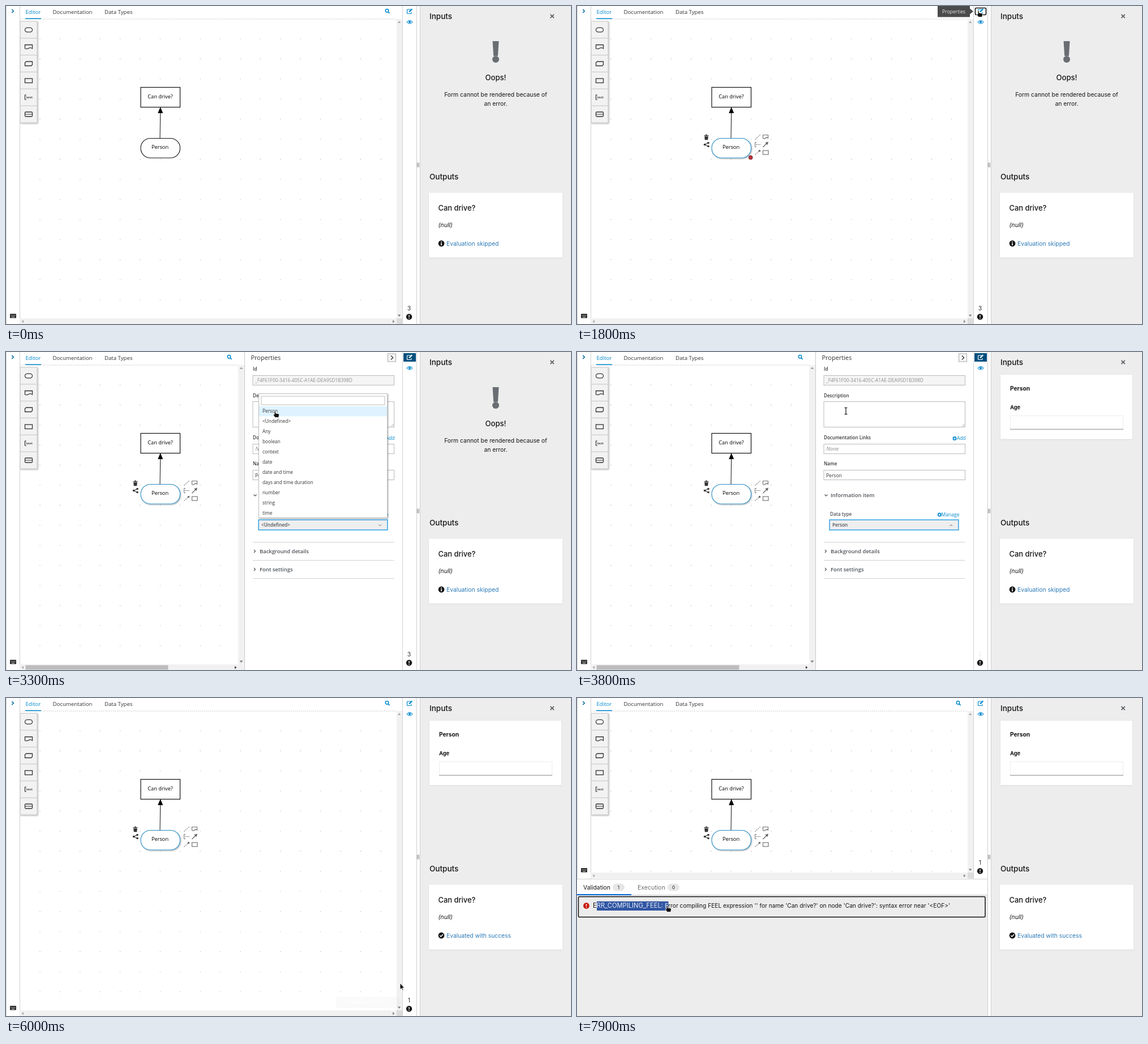
Recreate the animation shown at these times as an HTML page. Size 998 by 561 pixels, loop 8000 ms.

```html
<!DOCTYPE html>
<html lang="en">
<head>
<meta charset="utf-8">
<title>Decision editor</title>
<style>
html, body { margin: 0; width: 100%; height: 100%; overflow: hidden; background: #fff; }
svg { display: block; width: 100vw; height: 100vh; }
text { font-family: "Open Sans", sans-serif; white-space: pre; }
.ui { font-family: Inter, sans-serif; }
</style>
</head>
<body>
<svg id="stage" viewBox="0 0 998 561"></svg>
<script>
const LOOP = 8000, BLUE = '#0088ce', LINK = '#2b7ab8', GREY = '#ededed', INK = '#151515';
const ERROR = 'Error compiling FEEL expression \'\' for name \'Can drive?\' on node \'Can drive?\': syntax error near \'&lt;EOF&gt;\'';

// cy is the middle of the capital letters
const text = (x, cy, s, size, fill = '#333', more = '') =>
  `<text x="${x}" y="${cy + size * .36}" font-size="${size}" fill="${fill}" ${more}>${s}</text>`;
const ui = (x, cy, s, size, fill = INK, more = '') => text(x, cy, s, size, fill, 'class="ui" ' + more);
const rect = (x, y, w, h, fill = 'none', stroke = 'none', more = '') =>
  `<rect x="${x}" y="${y}" width="${w}" height="${h}" fill="${fill}" stroke="${stroke}" ${more}/>`;
const line = (d, stroke = '#333', w = 1, more = '') =>
  `<path d="${d}" fill="none" stroke="${stroke}" stroke-width="${w}" ${more}/>`;
const fill = (d, c = '#333', more = '') => `<path d="${d}" fill="${c}" ${more}/>`;
const dot = (x, y, r, c) => `<circle cx="${x}" cy="${y}" r="${r}" fill="${c}"/>`;
const group = (id, body, more = '') => `<g id="${id}" ${more}>${body}</g>`;
const bold = 'font-weight="600"', mid = 'text-anchor="middle"';

const search = x => `<circle cx="${x - 1}" cy="8.3" r="2.7" fill="none" stroke="${BLUE}" stroke-width="1.5"/>` +
  line(`M${x + 1} 10.3l2.6 2.6`, BLUE, 1.8);
const pencil = c => line('M715 6H709.5Q708.5 6 708.5 7V12.5Q708.5 13.5 709.5 13.5H715Q716 13.5 716 12.5V11', c, 1.2) +
  line('M712 10.5L717.3 5.2', c, 2.2);
const tip = (id, x, cy, s) => group(id, rect(x, cy - 10, 694 - x, 20, '#4b4b4b') +
  fill(`M694 ${cy - 5}l6 5-6 5z`, '#4b4b4b') + text((x + 694) / 2, cy, s, 8.5, '#e8e8e8', mid));
const gear = (x, y) => dot(x, y, 3.4, BLUE) + line(`M${x - 2} ${y}h4M${x} ${y - 2}v4`, '#fff', 1.2);

function grid() {
  let d = '';
  for (let x = 24.6; x < 690; x += 35.4)
    for (let y = 58; y < 550; y += 35.4) d += `M${x.toFixed(1)} ${y.toFixed(1)}h0`;
  return line(d, '#c4c4c4', 1.6, 'stroke-linecap="round"') + line('M24 23H690', '#c9c9c9', 1, 'stroke-dasharray="2 1.5"');
}

function palette() {
  const wave = 'M33.5 68.5H46.5V75Q43 72.5 40 74.5T33.5 75Z', cut = 'M35.5 98H46.5V103.5L44.5 105.5H33.5V100Z';
  let s = rect(25, 27, 30, 179, '#f2f2f2', '#c4c4c4', 'filter="url(#soft)"');
  for (let i = 1; i < 6; i++) s += line(`M25 ${27 + i * 29.8}h30`, '#c4c4c4');
  return s + rect(33.5, 38.3, 13, 7.6, '#fff', '#333', 'rx="3.8" stroke-width="1.3"') +
    line(wave, '#333', 1.3) + line(cut, '#333', 1.3, 'stroke-linejoin="round"') +
    rect(33.5, 128, 13, 7.5, 'none', '#333', 'stroke-width="1.3"') +
    line('M36 157H33.5V165H36', '#333', 1.2) + text(35.5, 161, 'text', 6, '#333', bold) +
    rect(33.5, 187, 13, 8, 'none', '#333', 'rx="1.5" stroke-width="1.3"') + line('M33.5 191h13');
}

function diagram() {
  const tools =
    fill('M224.5 228h8v1.2h-8zM227 226.7h3v1.3h-3zM225.2 230h6.6l-.6 6.2h-5.4z') +
    line('M231.5 241.5L225.5 244.5L231.5 247.5', '#333', 1.2) +
    dot(232, 241.5, 1.8, '#333') + dot(225.5, 244.5, 1.8, '#333') + dot(232, 247.5, 1.8, '#333') +
    line('M314.5 235.5L324.5 226.5M314.5 262.5L322 256', '#777', 1.1, 'stroke-dasharray="2 1.4"') + dot(322.5, 255.5, 1.7, '#666') +
    line('M317 240.5H314.5V248.5H317', '#777') + line('M316 244.5H324', '#777', 1, 'stroke-dasharray="2 1"') +
    line('M328.5 227.5H337.5V233Q335 231 333 233T328.5 233.5Z', '#777', 1.2) +
    line('M328.5 249L335 242.5', '#666', 1.3) + fill('M338 239.5l-1.5 5.8-4.2-4.2z', '#666') +
    rect(328.5, 255, 9.5, 7, 'none', '#777', 'stroke-width="1.2"');
  const pill = (c, more) => rect(238, 233.5, 69.5, 34.5, '#fff', c, 'rx="17" stroke-width="1.1" ' + more);
  return rect(238, 143.5, 69.5, 35, '#fff', '#111', 'stroke-width="1.2"') + text(272.5, 160, 'Can drive?', 9.25, '#000', mid) +
    line('M272 233L272.7 188', '#111') + fill('M272.7 178l4.5 11h-9z', '#000') +
    pill('#111', 'id="idle"') + group('picked', pill('#2c8fc6', 'filter="url(#soft)"') + tools) +
    text(272, 248.5, 'Person', 9.25, '#000', mid) +
    group('handle', `<circle cx="306.7" cy="267.3" r="3.5" fill="#b8323a" stroke="#6e2430" stroke-width=".8"/>`);
}

function properties() {
  const label = (y, s) => text(436, y, s, 8.05, '#363636', bold);
  const field = (y, h, bg = '#fff') => rect(436, y, 249.5, h, bg, '#bbb');
  const section = (y, s, d) => line(d, '#555', 1.2) + text(448, y, s, 9.4, '#4d5258', bold);
  const types = ['Person', '&lt;Undefined&gt;', 'Any', 'boolean', 'context', 'date', 'date and time',
    'days and time duration', 'number', 'string', 'time'];
  const menu = rect(446.5, 73.5, 227, 219, '#fff', '#bbb', 'filter="url(#soft)"') + rect(451, 78, 218, 15, '#fff', '#bbb') +
    rect(447, 95.5, 226, 18, '#def3ff') + types.map((s, i) => text(453, 104 + i * 18, s, 8.3)).join('');
  return rect(410, 0, 290, 561, '#fff') + rect(410, 23, 11, 528, '#f1f1f1') +
    fill('M412.5 30l3-3.5 3 3.5z', '#a3a3a3') + fill('M412.5 544.5l3 3.5 3-3.5z', '#777') +
    line('M421.5 0V561', '#c8c8c8') + search(395) +
    text(432.5, 10.5, 'Properties', 10.95, '#333') +
    rect(674.5, 3, 14, 14, '#f5f5f5', '#aaa') + line('M680 6.5l3.5 3.5-3.5 3.5', '#333', 1.3) +
    rect(675, 3.5, 13, 13, 'none', '#111', 'id="closeRing" rx="1" stroke-width="1.5"') +
    label(30, 'Id') + field(41.5, 17, '#f5f5f5') + text(440, 50.5, '_F4F61F00-3416-405C-A1AE-DEA95D1B398D', 8.33, '#8b8d8f') +
    label(77, 'Description') + field(87.5, 45) + line('M680 131.5l4.5-4.5M683 131.5l1.5-1.5', '#888', .8) +
    label(151, 'Documentation Links') + gear(667, 152.5) + text(671, 152.5, 'Add', 8.3, BLUE) +
    field(162.5, 17) + text(440.5, 171, 'None', 9.3, '#888', 'font-style="italic"') +
    label(197.5, 'Name') + field(208.5, 17) + text(440, 217.5, 'Person', 8.5) +
    section(252.5, 'Information item', 'M437.5 251.5l2.5 2.5 2.5-2.5') +
    text(447, 286, 'Data type', 8.2, '#4d5258', bold) + gear(640.3, 287) + text(643.5, 287, 'Manage', 8.6, BLUE) +
    group('glow', rect(446.5, 296.5, 227, 17, 'none', '#4db2ee', 'stroke-width="3"'), 'opacity=".7"') +
    rect(446.5, 296.5, 227, 17, '#eee', '#bbb', 'id="select"') +
    group('undefinedType', text(451, 305, '&lt;Undefined&gt;', 8.2, '#4d5258', bold) + line('M658.5 304.5l2.3 2.3 2.3-2.3', '#666')) +
    group('personType', text(451, 305.5, 'Person', 8.15, '#4d5258', bold) + line('M658.5 307l2.3-2.3 2.3 2.3', '#666')) +
    line('M436 335.5H685.5M436 367.5H685.5M436 399.5H685.5', '#d1d1d1') +
    section(352, 'Background details', 'M438 349l2.5 2.5-2.5 2.5') + section(384, 'Font settings', 'M438 381l2.5 2.5-2.5 2.5') +
    group('menu', menu);
}

function footer() {
  const closed = rect(24, 551, 676, 10, '#f1f1f1') + rect(690, 551, 10, 10, '#dcdcdc') +
    fill('M692 544.5l2.6 3.5 2.6-3.5z', '#777') + fill('M683 554l3.5 2.6-3.5 2.6z', '#888') + fill('M31 554l-3.5 2.6 3.5 2.6z', '#aaa');
  const open = rect(24, 551, 397, 10, '#f1f1f1') + rect(34.5, 552.5, 252, 8, '#bdbdbd') +
    fill('M404 554l3.5 2.6-3.5 2.6z', '#444') + fill('M31 554l-3.5 2.6 3.5 2.6z', '#aaa');
  return group('closedBar', closed) + group('openBar', open) +
    rect(7, 543, 11, 7.5, '#222', 'none', 'rx="1"') + line('M8.5 545.2h8.2M8.5 547h8.2', '#fff', .8, 'stroke-dasharray="1 .8"') + line('M10 549h5', '#fff', .8) +
    ui(712, 533.5, '3', 10.5, '#333', mid + ' id="count"') +
    dot(712, 548.3, 5.2, INK) + line('M712 545.2v3.6M712 550v1.5', '#fff', 1.5);
}

function frame() {
  return line('M.5 0V561M24.5 0V561M700.5 0V561', '#d2d2d2') + line('M10.3 6l3 3-3 3', '#006aa5', 1.6) +
    text(34.5, 10.5, 'Editor', 9.6, BLUE, 'font-weight="500"') + rect(34, 21.5, 28, 1.5, BLUE) +
    text(82.5, 10.5, 'Documentation', 9.65) + text(174, 10.5, 'Data Types', 9.65);
}

function sideIcons() {
  return rect(701, 0, 24, 561, '#fff') + group('editIdle', pencil(BLUE)) +
    group('editActive', rect(702, 2, 22, 15, '#004f7f') + pencil('#fff')) +
    rect(703.5, 3.5, 19, 12, 'none', '#111', 'id="editRing" rx="1.5" stroke-width="1.6"') +
    line('M708 28.5Q713 22.5 718 28.5Q713 34 708 28.5Z', BLUE, 1.1) + dot(713, 28.2, 2, BLUE);
}

function problems() {
  const badge = (x, s) => rect(x, 327.5, 21, 13, '#e6e6e6', 'none', 'rx="6.5"') + ui(x + 10.5, 334.2, s, 8, INK, mid);
  const message = c => ui(28, 366.5, `<tspan font-size="11.2">ERR_COMPILING_FEEL:</tspan><tspan x="155">${ERROR}</tspan>`, 10.2, c);
  return rect(0, 320, 725, 241, GREY) + rect(0, 320, 725, 28, '#fff') + line('M0 319.5H725', '#d2d2d2') +
    ui(11, 334, 'Validation', 10.4) + badge(63, '1') + ui(107, 334, 'Execution', 10.5, '#6a6e73') + badge(160, '0') +
    line('M0 347.5H725', '#d2d2d2') + rect(0, 346, 96, 2, '#0066cc') +
    rect(2.5, 350.5, 718.5, 36, '#ececec', '#111', 'id="focus" rx="2" stroke-width="1.5"') +
    dot(16.5, 366.5, 5.4, '#c9190b') + line('M16.5 363.3v3.8M16.5 368.3v1.5', '#fff', 1.5) + message(INK) +
    `<clipPath id="range">${rect(35, 358.5, 0, 16.5, '#000', 'none', 'id="marked"')}</clipPath>` +
    `<g clip-path="url(#range)">${rect(35, 358.5, 200, 16.5, '#3156a3')}${message('#e6ecf8')}</g>`;
}

function results() {
  return rect(725, 0, 273, 561, GREY) + rect(725, 0, 6, 561, '#fff') + line('M725.5 0V561M731.5 0V561', '#cfcfcf') +
    line('M726.8 276.5v8M729.2 276.5v8', '#777') +
    ui(748, 18.5, 'Inputs', 13.5, INK, 'font-weight="500"') + line('M961.5 14.8l6.4 6.4M967.9 14.8l-6.4 6.4', '#5a5e63', 1.7) +
    group('oops', fill('M859.5 62h11l-1.6 26h-7.8z', '#6a6e73') + dot(865, 94, 6, '#6a6e73') +
      ui(865, 126.3, 'Oops!', 13, INK, mid + ' font-weight="500"') +
      ui(865, 156, 'Form cannot be rendered because of', 10.35, INK, mid) + ui(865, 172.5, 'an error.', 10.35, INK, mid)) +
    group('form', rect(748, 40, 233, 113.5, '#fff', 'none', 'filter="url(#faint)"') + ui(765, 64.5, 'Person', 10.2, INK, 'font-weight="700"') +
      ui(765, 98, 'Age', 9.3, INK, 'font-weight="700"') + rect(765.5, 112.5, 199, 24, '#fff', '#ededed') + line('M765 136.3H965', '#8a8d90')) +
    ui(748, 301, 'Outputs', 13.5, INK, 'font-weight="500"') +
    group('output', rect(747, 329.5, 236, 114, '#fff', 'none', 'filter="url(#faint)"') +
      ui(763.5, 356, 'Can drive?', 12.9, INK, 'font-weight="500"') + ui(763.5, 386, '(null)', 10.6, INK, 'font-style="italic"') +
      dot(769, 419, 5.4, INK) +
      group('skipped', line('M769 415.6v1.6M769 418.3v4', '#fff', 1.7) + ui(778, 419, 'Evaluation skipped', 10.4, LINK)) +
      group('success', line('M766.3 419l2 2 3.6-3.9', '#fff', 1.5) + ui(778, 419, 'Evaluated with success', 10.3, LINK)));
}

const outline = 'stroke="#fff" stroke-width=".8"';
const pointer = group('arrow', fill('M0 0V11.3L2.6 9 4.3 12.8 6 12 4.3 8.4H7.8Z', '#111', outline)) +
  group('hand', fill('M0 0Q1.2 0 1.2 1.3V4L6 4.8Q7.8 5.2 7.5 7L6.6 11.5H.3L-3 7Q-2.6 5.3-1 6.3V1.3Q-1 0 0 0Z', '#111', outline)) +
  group('beam', line('M-2.5-6Q0-6 0-4.5Q0-6 2.5-6M0-5V5M-2.5 6Q0 6 0 4.5Q0 6 2.5 6', '#111', 1.2));

stage.innerHTML = `<defs>
  <filter id="soft" x="-20%" y="-20%" width="150%" height="150%"><feDropShadow dx="1.2" dy="1.2" stdDeviation="1.2" flood-opacity=".3"/></filter>
  <filter id="faint"><feDropShadow dx="0" dy=".7" stdDeviation=".8" flood-opacity=".1"/></filter></defs>` +
  rect(0, 0, 998, 561, '#fff') + grid() + rect(690, 23, 10, 530, '#f1f1f1') + fill('M692 30l2.6-3.5 2.6 3.5z', '#a3a3a3') +
  diagram() + palette() + search(674) + group('panel', properties()) + frame() + sideIcons() +
  group('foot', footer()) + group('problems', problems()) + results() +
  tip('editTip', 637, 9.5, 'Properties') + tip('noteTip', 583, 537, 'Notifications Panel') + group('cursor', pointer);

const el = id => document.getElementById(id);
const show = (id, on) => el(id).setAttribute('display', on ? 'inline' : 'none');
const set = (id, name, value) => el(id).setAttribute(name, value);
const ramp = (t, a, b) => Math.min(1, Math.max(0, (t - a) / (b - a)));

// time, x, y, shape until the next stop
const path = [
  [100, 925, 525, 'arrow'], [900, 285, 256, 'hand'], [1200, 285, 256, 'arrow'], [1600, 709, 8, 'hand'], [2050, 709, 8, 'arrow'],
  [2600, 490, 296, 'hand'], [2950, 490, 296, 'hand'], [3300, 475, 104, 'hand'], [3500, 475, 104, 'beam'], [3900, 475, 104, 'arrow'],
  [4400, 680, 10, 'hand'], [4950, 680, 10, 'arrow'], [5300, 962, 86, 'arrow'], [5500, 955, 88, 'arrow'], [6000, 696, 503, 'arrow'],
  [6200, 711, 545, 'hand'], [6450, 711, 545, 'arrow'], [7050, 35, 366, 'hand'], [7300, 35, 366, 'hand'], [7850, 159, 366, 'hand'], [LOOP, 159, 366, 'hand']
];

function moveCursor(t) {
  show('cursor', t >= 100);
  if (t < 100) return;
  const i = path.findIndex(p => p[0] > t), [t0, x0, y0, shape] = path[i - 1], [t1, x1, y1] = path[i];
  const u = ramp(t, t0, t1), k = u * u * (3 - 2 * u);
  set('cursor', 'transform', `translate(${x0 + (x1 - x0) * k} ${y0 + (y1 - y0) * k})`);
  for (const s of ['arrow', 'hand', 'beam']) show(s, s === shape);
}

function draw(t) {
  const within = (a, b) => t >= a && t < b;
  const open = within(2000, 5000), chosen = t >= 3500, done = t >= 4600, low = t >= 6400;
  show('idle', t < 1000);
  show('picked', t >= 1000);
  show('handle', within(1000, 2900));
  show('panel', open);
  show('openBar', open);
  show('closedBar', !open);
  show('editActive', open);
  show('editIdle', !open);
  show('editRing', within(1700, 2000));
  show('editTip', within(1700, 2000));
  show('closeRing', t >= 4600);
  show('menu', within(2900, 3500));
  show('glow', t >= 2900);
  set('glow', 'opacity', .75 - .45 * ramp(t, 3900, 4700));
  set('select', 'fill', within(2550, 2900) ? '#e0e0e0' : '#eee');
  set('select', 'stroke', t >= 2900 ? '#4aa9e0' : '#bbb');
  show('undefinedType', !chosen);
  show('personType', chosen);
  show('oops', t < 3700);
  show('form', t >= 3700);
  show('skipped', !done);
  show('success', done);
  set('output', 'opacity', done ? .3 + .7 * ramp(t, 4600, 4900) : 1);
  el('count').textContent = t < 3700 ? 3 : done ? 1 : 2;
  set('count', 'opacity', done ? ramp(t, 4550, 4700) : t < 3700 ? 1 : ramp(t, 3780, 4000));
  show('noteTip', within(5950, 6400));
  set('noteTip', 'opacity', t <= 6000 ? .02 : .02 + .98 * ramp(t, 6050, 6250));
  set('foot', 'transform', `translate(0 ${low ? -243 : 0})`);
  show('problems', low);
  set('focus', 'stroke', t >= 7300 ? '#111' : 'none');
  const u = ramp(t, 7300, 7850);
  set('marked', 'width', 126.5 * u * u * (3 - 2 * u));
  moveCursor(t);
}

const start = performance.now();
function tick() {
  draw((performance.now() - start) % LOOP);
  requestAnimationFrame(tick);
}
tick();
</script>
</body>
</html>
```
